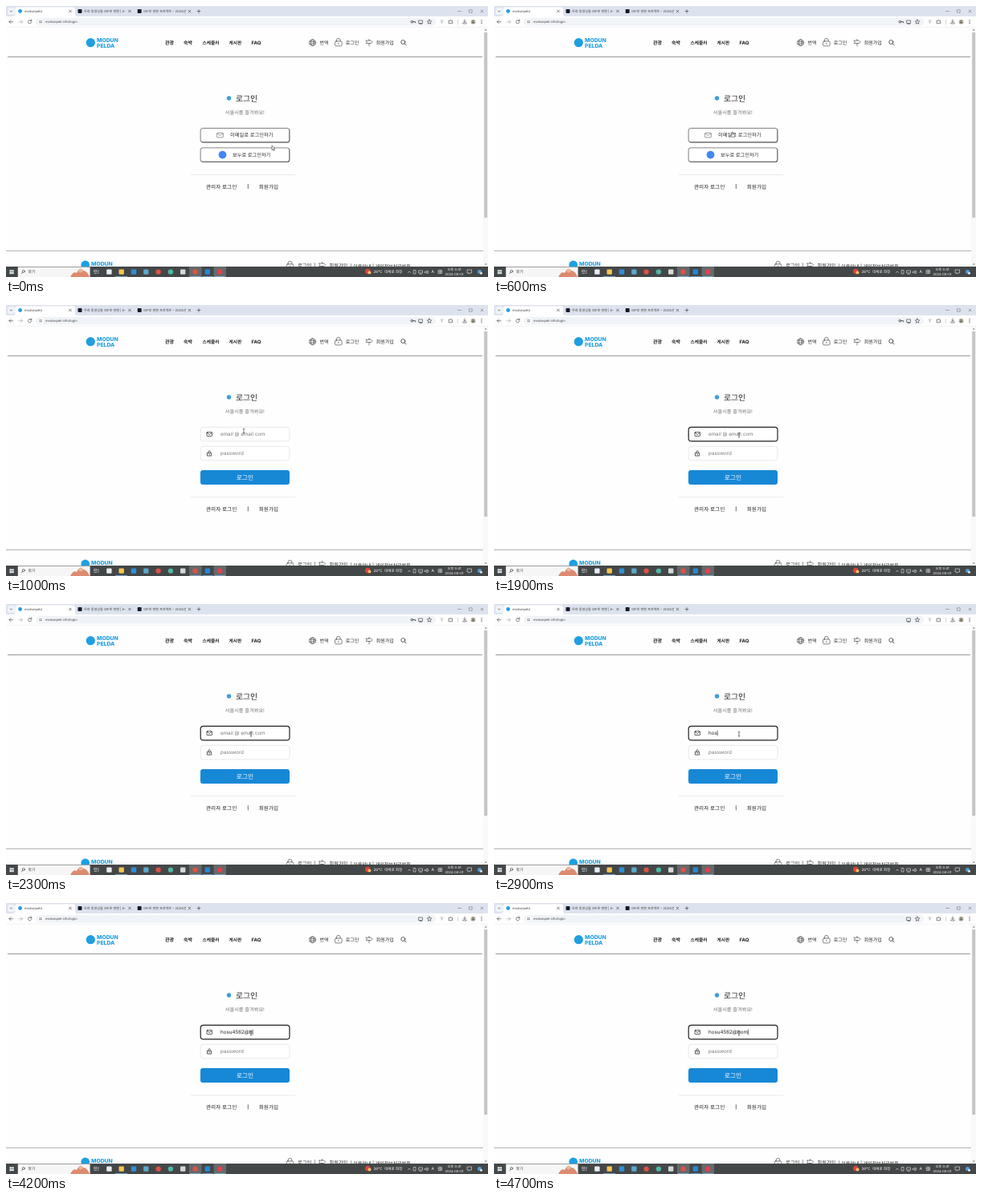
Write an HTML page that moves like this. It is 600 by 338 pixels and loops after 5 s.

```html
<!DOCTYPE html>
<html lang="ko">
<head>
<meta charset="utf-8">
<title>로그인</title>
<style>
  html, body { margin: 0; width: 100%; height: 100%; overflow: hidden; background: #fefefe; }
  svg { display: block; width: 100vw; height: 100vh; }
  text { font-family: Inter, "Noto Sans CJK KR", "Noto Sans CJK", sans-serif; font-size: 6px; fill: #222; text-rendering: geometricPrecision; white-space: pre; }
  .bold { font-weight: 700; }
  .brand { font-weight: 800; font-size: 6.8px; fill: #1f9fe2; }
  .tab { font-size: 4.1px; fill: #444; }
  .bar text { font-size: 4.2px; fill: #fff; }
  .muted { fill: #777; }
  .line { fill: none; stroke: #333; stroke-width: .8; stroke-linecap: round; stroke-linejoin: round; }
  .thin { stroke-width: .6; }
  .pale { stroke: #e8e8e8; }
  .field { font-size: 6.25px; }
  .box { fill: #fff; stroke: #dedede; stroke-width: .7; }
</style>
</head>
<body>
<svg viewBox="0 0 600 338" preserveAspectRatio="none">
  <defs>
    <g id="close"><path class="line thin" d="M-1.4-1.4L1.4 1.4M1.4-1.4L-1.4 1.4"/></g>
    <g id="mail"><rect class="line" x="-3.2" y="-2.5" width="6.4" height="5" rx=".6"/><path class="line" d="M-3-2L0 .4 3-2"/></g>
    <g id="person"><rect class="line thin" x="-4.3" y="-1.6" width="8.6" height="6" rx="1.6"/><path class="line thin" d="M-2.4-1.6V-3a2.4 2.1 0 0 1 4.8 0v1.4M0 .6v1.6"/></g>
    <g id="sign"><path class="line thin" d="M-3.8-2.4H2.5L4.2-.7 2.5 1H-3.8L-2.8-.7ZM0-4v1.6M0 1v3.4"/></g>
  </defs>
  <rect width="600" height="338" fill="#fefefe"/>

  <!-- browser chrome -->
  <rect width="600" height="13" fill="#dde3ee"/>
  <rect x="2" y="2" width="9" height="9" rx="3" fill="#f0f3f8"/>
  <path class="line thin" d="M5 6L6.4 7.3 7.8 6"/>
  <path d="M9 13q2.5 0 2.5-3V4.5q0-3 3-3H83q3 0 3 3V10q0 3 2.5 3z" fill="#fff"/>
  <circle cx="17.6" cy="6.5" r="2.4" fill="#1f9fe2"/>
  <text class="tab" x="23" y="8">modunpeld</text>
  <rect x="89.5" y="4" width="5" height="5" rx=".8" fill="#171b2b"/>
  <text class="tab" x="97" y="8">무료 동영상을 GIF로 변환 | A-</text>
  <rect x="163.7" y="4" width="5" height="5" rx=".8" fill="#171b2b"/>
  <text class="tab" x="171" y="8">GIF로 변환 프로젝트 - 2024년</text>
  <use href="#close" x="80" y="6.5"/><use href="#close" x="154" y="6.5"/><use href="#close" x="228.5" y="6.5"/>
  <path class="line thin" d="M238 6.5h4M240 4.500v4"/>
  <path class="line thin" stroke-opacity=".6" d="M562.5 6.5h4M576.8 4.8h3.400v3.400h-3.400z"/>
  <use href="#close" x="592.5" y="6.5" opacity=".7"/>

  <path class="line thin" d="M8.5 19.7H4M6 17.7l-2 2 2 2"/>
  <path class="line thin" stroke-opacity=".45" d="M16 19.7h4.5M18.5 17.7l2 2-2 2"/>
  <path class="line thin" d="M31.4 18.3a2.2 2.2 0 1 0 .5 1.8M31.8 17v1.7h-1.7"/>
  <rect x="37" y="15" width="498" height="9.5" rx="4.7" fill="#f0f3f8"/>
  <circle cx="43" cy="19.7" r="3.4" fill="#fff"/>
  <path class="line thin" d="M41.5 18.8h3M41.5 20.7h3"/>
  <text class="tab" x="49" y="21.2">modunpeli.info/login</text>
  <g id="key"><circle class="line" cx="505.3" cy="19.7" r="1.3"/><path class="line" d="M506.7 19.7h3v1.2"/></g>
  <path class="line thin" d="M514 18h4.5v3.5H514zM515 22.5h2.5"/>
  <path class="line thin" d="M527 17l.8 1.800 2 .2-1.500 1.300.4 2-1.700-1-1.700 1 .4-2-1.500-1.300 2-.2z"/>
  <path class="line thin" stroke-opacity=".35" d="M540.5 18h4M542.5 18v3.6M541 20h3"/>
  <path class="line thin" d="M551.5 18.3h1.2a.8.8 0 0 1 1.6 0h1.2v3.5h-4zM571 17v3.3M569.6 19l1.4 1.4 1.4-1.4M568.8 21v1h4.4v-1"/>
  <path class="line thin" stroke-opacity=".3" d="M562.5 17v5.5"/>
  <circle cx="581.5" cy="19.7" r="3" fill="#c3b8a4"/>
  <path d="M579.3 21.5a2.2 2 0 0 1 4.4 0z" fill="#6a6f68"/><circle cx="581.5" cy="18.8" r="1" fill="#6a6f68"/>
  <g fill="#444"><circle cx="592" cy="17.7" r=".6"/><circle cx="592" cy="19.7" r=".6"/><circle cx="592" cy="21.7" r=".6"/></g>
  <path d="M0 26.3H600" stroke="#e9ebee" stroke-width=".6"/>

  <!-- page header -->
  <circle cx="105.3" cy="45.7" r="5.6" fill="#1f9fe2"/>
  <text class="brand" x="113" y="45.3">MODUN</text>
  <text class="brand" x="113" y="52">PELDA</text>
  <g class="bold">
    <text x="198" y="47.8">관광</text><text x="221" y="47.8">숙박</text>
    <text x="244.5" y="47.8" style="font-size:5.7px">스케줄러</text>
    <text x="277.5" y="47.8" style="font-size:5.7px">게시판</text><text x="305.6" y="47.8">FAQ</text>
  </g>
  <circle class="line thin" cx="381.5" cy="45.7" r="3.9"/>
  <ellipse class="line thin" cx="381.5" cy="45.7" rx="1.8" ry="3.9"/>
  <path class="line thin" d="M377.8 44.3h7.4M377.8 47.1h7.4"/>
  <text x="390.5" y="47.9">번역</text>
  <use href="#person" x="413.8" y="45.5"/><text x="422.8" y="47.9">로그인</text>
  <use href="#sign" x="452" y="45.5"/><text x="460.8" y="47.9">회원가입</text>
  <circle class="line" cx="494.3" cy="45" r="2.5"/><path class="line" d="M496.2 47l2 2"/>
  <path d="M2 63.4H593" stroke="#888" stroke-width=".9"/>

  <!-- sign-in panel -->
  <circle cx="277.5" cy="115" r="2.7" fill="#3a9fe0"/>
  <text x="286" y="118.5" style="font-size:9.8px">로그인</text>
  <text class="muted" x="272.8" y="135.2" style="font-size:6.2px">서울시를 즐겨봐요!</text>

  <g id="choices">
    <g id="choiceBoxes">
      <rect x="242.3" y="152.8" width="111" height="17.7" rx="3" fill="#444"/>
      <rect x="242.1" y="152.4" width="110.6" height="17.3" rx="2.8" fill="#fff" stroke="#555" stroke-width=".7"/>
    </g>
    <use href="#choiceBoxes" y="24.5"/>
    <g class="thinMail" fill="none" stroke="#555" stroke-width=".6"><rect x="262.6" y="158.200" width="7.800" height="5.800" rx=".8"/><path d="M263 159l3.500 2.500 3.500-2.500"/></g>
    <text x="279" y="163.4" style="font-size:6.25px">이메일로 로그인하기</text>
    <circle cx="269.5" cy="185.6" r="4.9" fill="#4285f4"/>
    <text x="282" y="187.9" style="font-size:6.2px">보누로 로그인하기</text>
  </g>

  <g id="form">
    <rect id="emailBox" class="box" x="242.2" y="152.3" width="110.8" height="17.6" rx="3.5"/>
    <use href="#mail" x="253.2" y="161.2"/>
    <text id="email" class="field" x="267" y="163.3"></text>
    <path id="caret" d="M0 157.5v7" stroke="#111" stroke-width=".6"/>
    <rect class="box" x="242.2" y="176.3" width="110.8" height="17.6" rx="3.5"/>
    <path class="line" d="M250.8 184.5h4.8v3.6h-4.8zM251.8 184.5v-1a1.4 1.4 0 0 1 2.8-.3M253.2 186v.8"/>
    <text class="field muted" x="267" y="187.2">password</text>
    <rect x="242" y="206" width="111" height="18" rx="3" fill="#1788d6"/>
    <text x="286.8" y="217.9" style="font-size:7.7px;fill:#fff">로그인</text>
  </g>

  <g id="links">
    <path d="M230 210.4H360" stroke="#e4e4e4" stroke-width=".8"/>
    <text x="249" y="227.5" style="font-size:6.6px">관리자 로그인</text>
    <path d="M301.3 222v6" stroke="#333" stroke-width=".7"/>
    <text x="314.8" y="227.5" style="font-size:6.6px">회원가입</text>
  </g>

  <!-- page footer -->
  <path d="M0 305.3H594" stroke="#999" stroke-width=".8"/>
  <circle cx="98.7" cy="323" r="5.4" fill="#1f9fe2"/>
  <text class="brand" x="106" y="323.8">MODUN</text>
  <use href="#person" x="353.5" y="323.5"/><text x="363" y="325.8" style="font-size:6.3px">로그인</text>
  <text x="383.5" y="325.8">|</text>
  <use href="#sign" x="393.5" y="323.5"/><text x="402.5" y="325.6" style="font-size:6.2px">회원가입</text>
  <text x="428.5" y="326.5">| 이용안내 | 개인정보처리방침</text>

  <!-- scrollbar -->
  <rect x="594" y="26.5" width="6" height="299" fill="#f8f8f8"/>
  <rect x="595.3" y="33" width="3.8" height="231" fill="#c4c4c4"/>
  <path d="M595.8 30.5l1.4-1.8 1.4 1.8zM595.8 321.5l1.4 1.8 1.4-1.8z" fill="#777"/>

  <!-- taskbar -->
  <g class="bar">
    <rect y="325" width="600" height="13" fill="#444748"/>
    <path d="M4.5 329.3h2.4v2.3H4.5zM7.3 329.3h2.4v2.3H7.3zM4.5 332h2.4v2.3H4.5zM7.3 332h2.4v2.3H7.3z" fill="#e8f3f8"/>
    <rect x="14.8" y="325.5" width="89.800" height="12.500" fill="#f6f6f6"/>
    <circle class="line thin" cx="21.8" cy="331" r="1.5"/><path class="line thin" d="M20.7 332.2l-1.4 1.6"/>
    <text x="27.5" y="333.3" style="font-size:4.8px;fill:#444">찾기</text>
    <path d="M80 338q4-8 8-5 4-8 8-3 5 0 8 8z" fill="#dc8a70"/><circle cx="93" cy="330" r="2.5" fill="#e8b89a"/>
    <path class="line pale thin" d="M110 329.5h3v2h-3zM110 333.5h3M115 329.5v4"/>
    <rect x="228" y="325" width="15.5" height="13" fill="#66696a"/>
    <rect x="258.500" y="325" width="15.500" height="13" fill="#66696a"/>
    <g id="apps"></g>
    <path d="M136 337.5h15M229 337.5h13.5M244.5 337.5h13M259.5 337.5h13.5" stroke="#7fb7df" stroke-width=".8"/>
    <circle cx="450.300" cy="331" r="3.200" fill="#e0453a"/><circle cx="452.500" cy="332.500" r="2" fill="#f4c069"/>
    <text x="457.5" y="333.3" style="font-size:4.6px">26°C  대체로 화창</text>
    <path class="line pale thin" d="M500.5 332.5l1.5-1.5 1.5 1.5M507.5 329.5h2.5v4.5h-2.5zM514 330h4.5v3H514zM515 334.3h2.5M521.5 331.3h1.2l1.5-1.4v4l-1.5-1.4h-1.2zM525.5 330.5q1 1.4 0 2.8"/>
    <text x="529.5" y="333.4" style="font-size:5px">A</text>
    <path class="line pale thin" d="M538.5 329.5h4v4h-4zM538.5 331.5h4M540.5 329.5v4"/>
    <text x="558" y="330.3" text-anchor="middle">오후 3:41</text>
    <text x="558" y="336" text-anchor="middle" style="font-size:4px">2024-06-01</text>
    <path class="line pale thin" d="M574.5 329h5v4h-2l-1.2 1.3V333h-1.8z"/>
    <circle cx="589.5" cy="331.500" r="2.5" fill="#4f9fd8"/><circle cx="591.5" cy="333.3" r="1.5" fill="#e8e8e8"/>
  </g>

  <g id="pointer">
    <path id="arrow" d="M-1-3v5.600l1.300-1.200 1 2.200.9-.4-1-2.100h1.700z" fill="#fff" stroke="#222" stroke-width=".55"/>
    <path id="hand" d="M-.8-3a.6.6 0 0 1 1.2 0v2l2 .5q.6.2.5 1L2.5 3h-3L-2.4.6q0-.9 1-.4l.6.5z" fill="#fff" stroke="#222" stroke-width=".5"/>
    <path id="beam" d="M-1.2-2.6H1.2M0-2.6V2.6M-1.2 2.6H1.2" fill="none" stroke="#222" stroke-width=".6"/>
  </g>
</svg>
<script>
  const LOOP = 5000, FORM_AT = 700, FOCUS_AT = 1900;
  const ENTRY = "hosu4562@bom";
  const KEY_TIMES = [2400, 2600, 2900, 3000, 3200, 3400, 3500, 3700, 4000, 4200, 4600, 4700];
  // pointer waypoints: time, x, y
  const PATH = [[0, 332, 177], [400, 297, 160.5], [900, 297, 160.5], [1000, 296, 157],
                [1400, 305, 161.5], [1600, 305, 162.3], [LOOP, 305, 162.3]];
  const $ = id => document.getElementById(id);
  const show = (id, on) => $(id).setAttribute("display", on ? "inline" : "none");

  const APPS = [["square", "#e8edf0"], ["square", "#f3c64e"], ["square", "#2f8fd8"], ["square", "#5aa9cc"],
                ["round", "#de5246"], ["round", "#4fb8a6"], ["square", "#d5d8d9"], ["round", "#de5246"],
                ["square", "#2489d8"], ["round", "#e8404e"]];
  $("apps").innerHTML = APPS.map(([shape, color], i) => {
    const radius = shape === "round" ? 3.2 : 1;
    return `<rect x="${125.2 + i * 15.3}" y="328.4" width="6.4" height="6.4" rx="${radius}" fill="${color}"/>`;
  }).join("");

  function pointerAt(t) {
    const i = PATH.findIndex(p => p[0] > t);
    const [t0, x0, y0] = PATH[i - 1], [t1, x1, y1] = PATH[i];
    const k = (t - t0) / (t1 - t0);
    return [x0 + (x1 - x0) * k, y0 + (y1 - y0) * k];
  }

  let drawn = -1;
  function draw(now) {
    const t = Math.floor(now % LOOP / 100) * 100;
    if (t !== drawn) {
      drawn = t;
      const inForm = t >= FORM_AT, focused = t >= FOCUS_AT;
      const typed = KEY_TIMES.filter(k => k <= t).length;
      show("choices", !inForm);
      show("form", inForm);
      $("links").setAttribute("transform", `translate(0 ${inForm ? 29.3 : 0})`);

      $("email").textContent = typed ? ENTRY.slice(0, typed) : "email @ email.com";
      $("email").style.fill = typed ? "#222" : "#777";
      $("emailBox").style.stroke = focused ? "#222" : "#dedede";
      $("emailBox").style.strokeWidth = focused ? 1.2 : .7;
      show("caret", typed);
      if (typed) $("caret").setAttribute("transform", `translate(${267.4 + $("email").getComputedTextLength()} 0)`);
      show("key", !typed);

      $("pointer").setAttribute("transform", `translate(${pointerAt(t)})`);
      show("arrow", t < 200);
      show("hand", t >= 200 && !inForm);
      show("beam", inForm);
    }
    requestAnimationFrame(draw);
  }
  requestAnimationFrame(draw);
</script>
</body>
</html>
```
